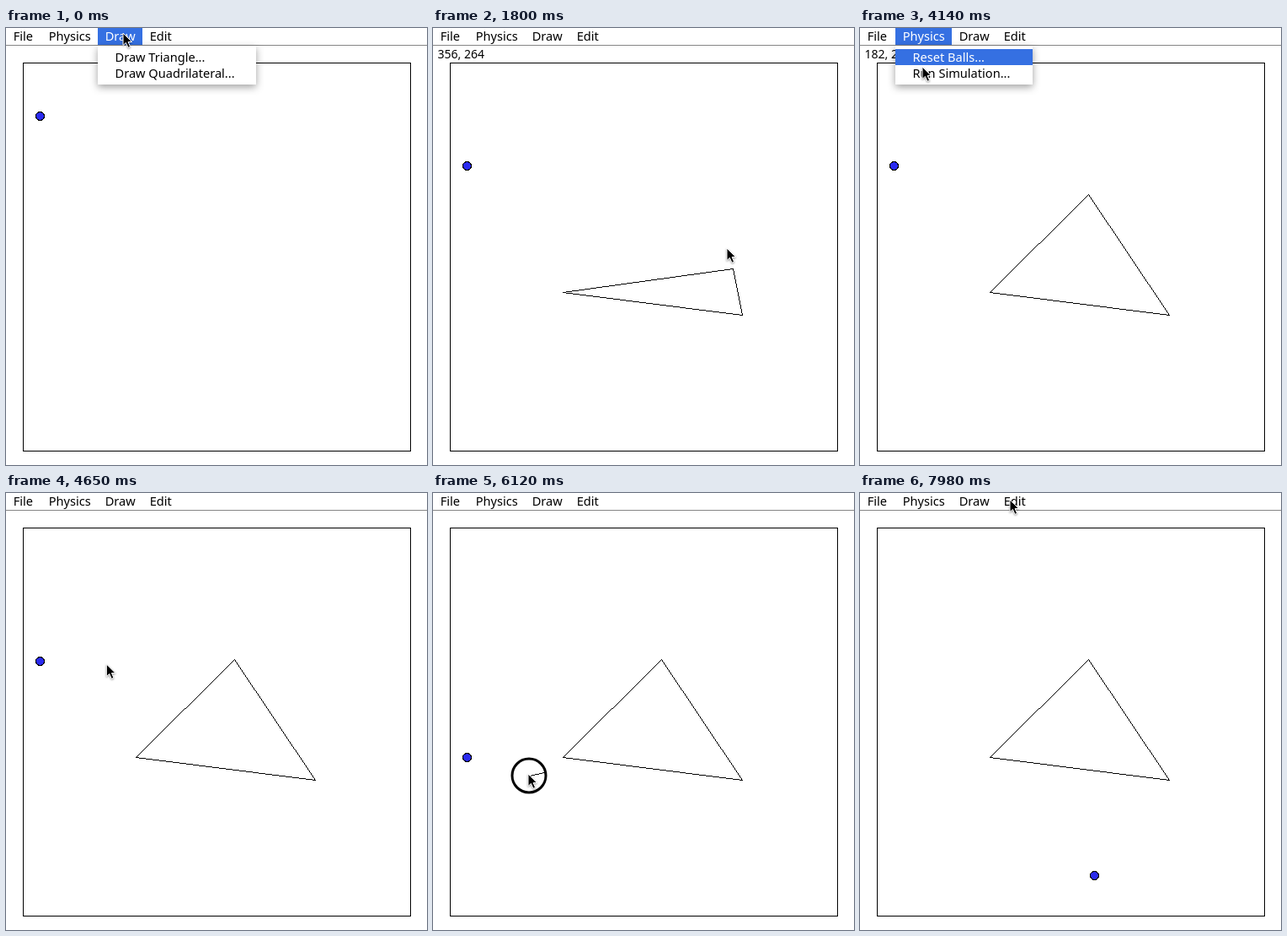
An HTML page that plays this animation: 500 px wide and 518 px high, repeating every 8 s.

```html
<!DOCTYPE html>
<html lang="en">
<head>
<meta charset="utf-8">
<title>Bouncing ball sandbox</title>
<style>
  html, body { margin: 0; width: 100%; height: 100%; overflow: hidden; background: #fff; }
  svg { display: block; }
  text { font: 14.6px "Noto Sans", "Open Sans", sans-serif; white-space: pre; }
  #label { font-size: 14px; }
  .crisp { shape-rendering: crispEdges; }
  .thin { fill: none; stroke: #000; stroke-width: 1; }
  .popup { filter: drop-shadow(0 3px 5px rgba(0, 0, 0, .38)); }
  #cursor { stroke: #fff; filter: drop-shadow(0 1.5px 1px rgba(0, 0, 0, .4)); }
</style>
</head>
<body>
<svg width="500" height="518" viewBox="0 0 500 518">
  <rect class="crisp" y="20" width="500" height="1" fill="#858585"/>
  <text id="label" x="5.5" y="36"></text>
  <rect class="thin crisp" x="20.5" y="41.5" width="460" height="460"/>
  <path id="shape" class="thin crisp"/>
  <circle id="ball" class="crisp" r="5" fill="#2a2af0" stroke="#000"/>
  <g id="menus"></g>
  <g id="dial">
    <circle cx="114" cy="335" r="20" fill="none" stroke="#000" stroke-width="3"/>
    <path id="needle" class="thin crisp"/>
  </g>
  <path id="cursor" d="M0 0V14.5L3.4 11.4L6 17.3L8.6 16.2L6.1 10.5H10.6Z"/>
</svg>
<script>
const LOOP = 8000, STEP = 30, POINTER_LAG = 30;
const DRAW_PICKED = 420, RELEASE = 4283, CATCH = 5756, LAUNCH = 6640;
const A = [154, 313], B = [367, 340], C = [271, 197], DIAL = [114, 335];
const $ = id => document.getElementById(id);

// Pointer stops: arrival time, place, time spent there
const stops = [
  [0, [139, 6], 90],
  [330, [150, 35], 110],
  [900, A, 100],
  [1400, [378, 343], 0],
  [1540, B, 180],
  [1770, [356, 285], 0],
  [1800, [349, 261], 0],
  [2080, C, 220],
  [2540, [192, 150], 0],
  [2950, [182, 23], 0],
  [3150, [69, -3], 0],
  [4140, [74, 46], 140],
  [4900, [150, 309], 880],
  [6000, [113, 333], 600],
  [7260, [78, 200], 0],
  [7980, [178, 8], 0]
];

const menus = [
  { name: "File", width: 42 },
  { name: "Physics", width: 67, popup: 163, items: ["Reset Balls...", "Run Simulation..."], open: [3330, 4270] },
  { name: "Draw", width: 53, popup: 188, items: ["Draw Triangle...", "Draw Quadrilateral..."], open: [0, DRAW_PICKED] },
  { name: "Edit", width: 45 }
];

function set(el, attrs) {
  for (const key in attrs) el.setAttribute(key, attrs[key]);
}

function add(parent, tag, attrs, content = "") {
  const el = document.createElementNS("http://www.w3.org/2000/svg", tag);
  set(el, attrs);
  el.textContent = content;
  return parent.appendChild(el);
}

const show = (el, on) => { el.style.display = on ? "" : "none"; };

function addEntry(parent, x, y, width, height, indent, baseline, name) {
  return {
    bar: add(parent, "rect", { x, y, width, height, fill: "#3570e2" }),
    text: add(parent, "text", { x: x + indent, y: baseline }, name)
  };
}

function highlight({ bar, text }, on) {
  show(bar, on);
  text.setAttribute("fill", on ? "#fff" : "#000");
}

let menuX = 0;
for (const menu of menus) {
  const x = menuX;
  menuX += menu.width;
  menu.title = addEntry($("menus"), x, 0, menu.width, 20, 8.7, 15, menu.name);
  if (!menu.items) continue;
  menu.group = add($("menus"), "g", {});
  add(menu.group, "rect", { class: "popup", x, y: 21, width: menu.popup, height: 46, fill: "#fff" });
  menu.rows = menu.items.map((name, i) =>
    addEntry(menu.group, x, 25 + 19 * i, menu.popup, 19, 20.5, 39.5 + 19.5 * i, name));
}

function pointer(t) {
  const next = stops.findIndex(stop => stop[0] > t);
  if (next < 1) return stops.at(next - (next === 0 ? 0 : 0) < 0 ? -1 : 0)[1];
  const [arrived, from, stay] = stops[next - 1], [arrival, to] = stops[next];
  const leave = arrived + stay;
  const k = Math.max(0, (t - leave) / (arrival - leave));
  return from.map((v, axis) => v + (to[axis] - v) * k);
}

// Unsmoothed line, one pixel per step along the longer axis
function pixelLine([x0, y0], [x1, y1]) {
  const count = Math.max(1, Math.abs(x1 - x0), Math.abs(y1 - y0));
  let d = "";
  for (let i = 0; i <= count; i++) {
    const x = Math.round(x0 + (x1 - x0) * i / count);
    const y = Math.round(y0 + (y1 - y0) * i / count);
    d += `M${x} ${y + 0.5}h1`;
  }
  return d;
}

// Elastic bounce: reflect a value that passes a limit
const fold = (value, limit) => value > limit ? 2 * limit - value : value;
const fall = (y, speed, t) => y + speed * t + 0.0002695 * t * t;

function ballAt(t) {
  if (t < DRAW_PICKED) return [40, fall(104, 0.027, t)];
  if (t < RELEASE) return [40, 163];
  if (t < LAUNCH) return [40, fall(163, 0, fold(Math.min(t, CATCH) - RELEASE, 1110))];
  const flight = t - LAUNCH;
  const sinceCeiling = fold(Math.abs(flight - 516), 769);
  return [fold(40 + 0.4618 * flight, 468.5), fall(47.5, 0.375, sinceCeiling)];
}

function needleTip(t) {
  const turning = Math.min(t, 6330) + Math.max(0, t - 6480);
  const angle = (12 + (turning - 6120) * 0.114) * Math.PI / 180;
  return [DIAL[0] + Math.round(18 * Math.cos(angle)), DIAL[1] - Math.round(18 * Math.sin(angle))];
}

function render(t) {
  const lagged = pointer(t - POINTER_LAG);
  const mouse = pointer(Math.min(t - POINTER_LAG, 2950)).map(Math.round);
  set($("cursor"), { transform: `translate(${pointer(t)})` });

  show($("label"), t >= 480 && t < RELEASE);
  $("label").textContent = `${mouse[0]}, ${mouse[1] - 21}`;

  const corners = t < 960 ? [] : t < 1650 ? [A, mouse] : t < 2250 ? [A, B, mouse] : [A, B, C];
  set($("shape"), {
    d: corners.map((corner, i) => pixelLine(corner, corners[(i + 1) % corners.length])).join("")
  });

  const [cx, cy] = ballAt(t).map(v => Math.round(v) + 0.5);
  set($("ball"), { cx, cy });

  const hoverRow = Math.floor((lagged[1] - 26) / 19);
  for (const { title, group, rows, open } of menus) {
    const isOpen = !!open && t >= open[0] && t < open[1];
    highlight(title, isOpen);
    if (!group) continue;
    show(group, isOpen);
    rows.forEach((row, i) => highlight(row, i === hoverRow));
  }

  show($("dial"), t >= 6020 && t < LAUNCH);
  set($("needle"), { d: pixelLine(DIAL, needleTip(t)) });
}

function tick() {
  const t = performance.now() % LOOP;
  render(Math.floor(t / STEP) * STEP);
  requestAnimationFrame(tick);
}
tick();
</script>
</body>
</html>
```
